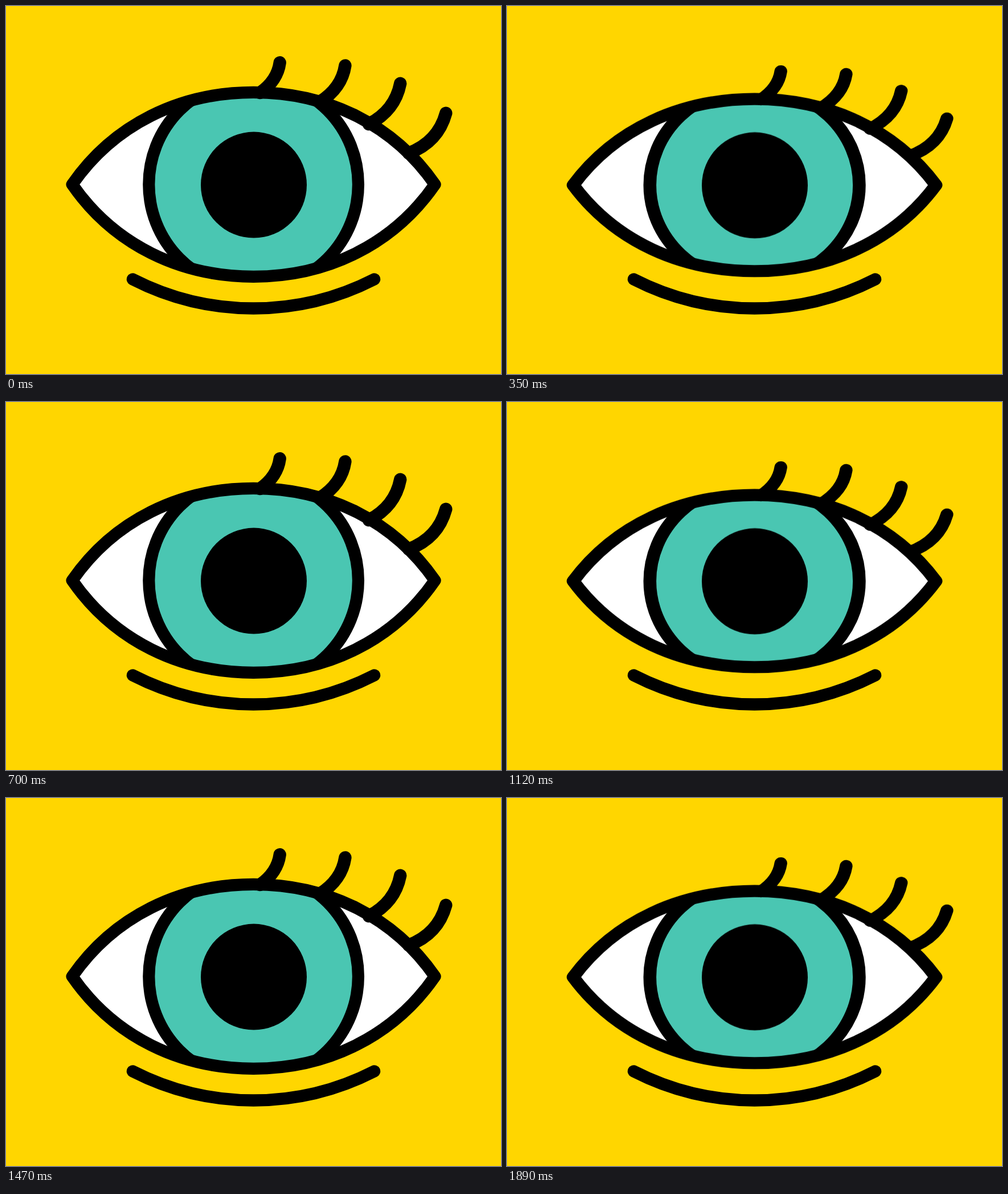
An HTML page that plays this animation: 869x645 px, repeating every 2.24 s.

```html
<!DOCTYPE html>
<html lang="en">
<head>
<meta charset="utf-8">
<title>Eye</title>
<style>
  html, body { margin: 0; width: 100%; height: 100%; overflow: hidden; background: #ffd600; }
  svg { display: block; width: 100vw; height: 100vh; }
  #eye { transform-origin: 434.6px 312.8px; }
  .line { fill: none; stroke: #000; stroke-linecap: round; stroke-linejoin: round; }
</style>
</head>
<body>
<svg viewBox="0 0 869 645">
  <defs>
    <path id="lid" d="M116.2 312.8 C189.5 207.3 305.6 151.3 434.6 151.3 S679.7 207.3 753 312.8
      C679.7 418.3 563.6 474.3 434.6 474.3 S189.5 418.3 116.2 312.8Z"/>
    <clipPath id="opening"><use href="#lid"/></clipPath>
  </defs>
  <g id="eye">
    <use href="#lid" fill="#fff"/>
    <g clip-path="url(#opening)">
      <circle cx="434.6" cy="312.8" r="183.8" fill="#4ac6b2" stroke="#000"/>
    </g>
    <use href="#lid" class="line"/>
    <path class="line" stroke-width="22.4" d="M480.7 99.2 Q476.5 130.5 446 152 M595.4 104.4 Q589.5 143.5 551 168
      M692.2 135.8 Q683 183 637 207 M772.3 187.8 Q758.5 238.5 707 258"/>
  </g>
  <circle id="pupil" cx="435" cy="313.6" r="93"/>
  <path class="line" stroke-width="21.5" d="M222.5 479 A466 466 0 0 0 646.5 479"/>
</svg>
<script>
  const duration = 2240;
  const switches = [0, 350, 700, 1120, 1470, 1890, duration];

  // Hold each pose until the next switch time.
  function alternate(id, open, squint) {
    const frames = switches.map((time, i) => ({
      ...(i % 2 ? squint : open),
      offset: time / duration,
      easing: 'steps(1, end)'
    }));
    document.getElementById(id).animate(frames, { duration, iterations: Infinity });
  }

  alternate('eye',
    { transform: 'translateY(0px) scaleY(1)', strokeWidth: '21.2px' },
    { transform: 'translateY(1px) scaleY(0.934)', strokeWidth: '22.6px' });
  alternate('pupil',
    { transform: 'translateY(0px)' },
    { transform: 'translateY(0.7px)' });
</script>
</body>
</html>
```
